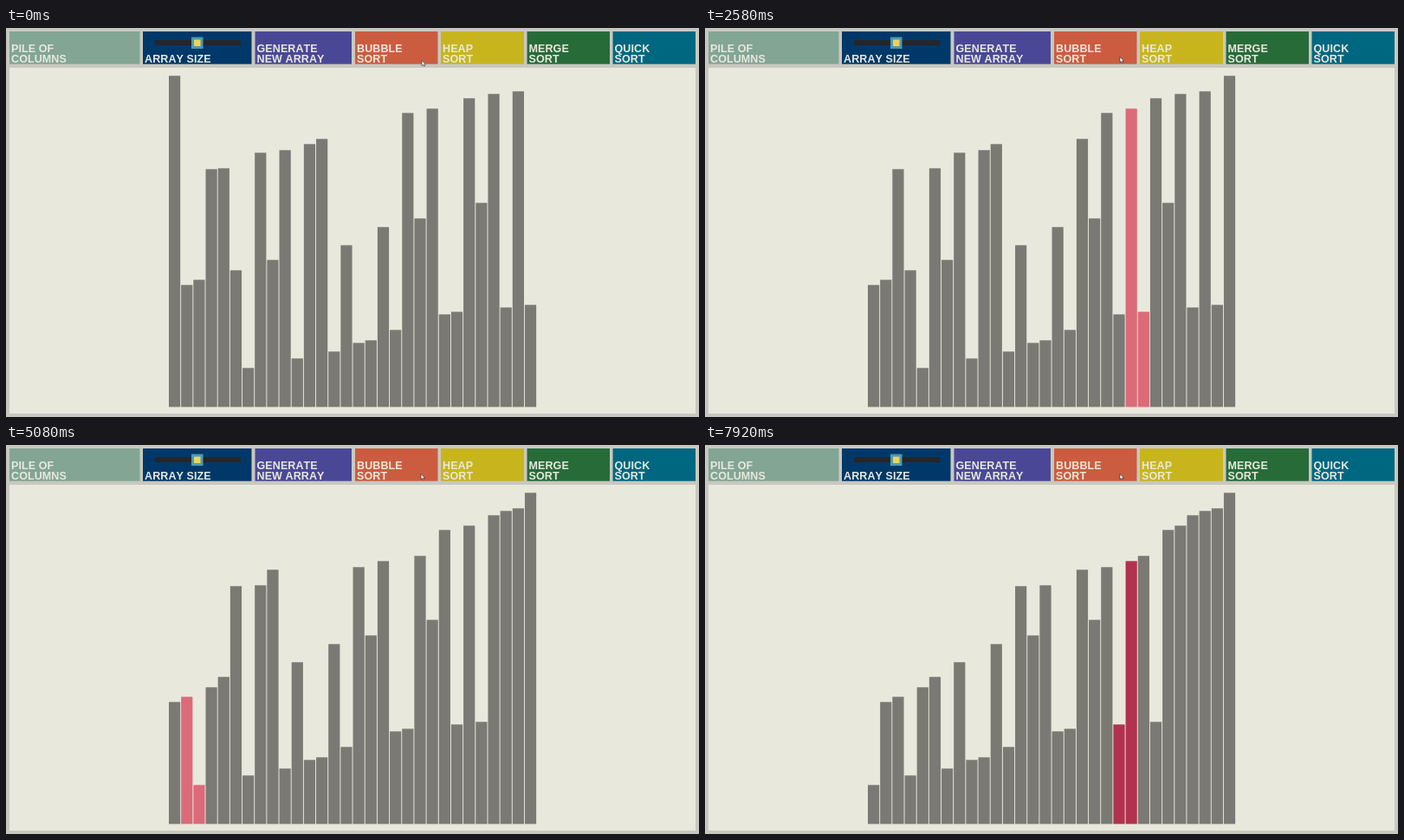
Write an HTML page that moves like this. It is 800 px wide and 450 px high and loops after 8000 ms.

```html
<!DOCTYPE html>
<html lang="en">
<head>
<meta charset="utf-8">
<title>Bubble sort</title>
<style>
  html, body { margin: 0; width: 100%; height: 100%; overflow: hidden; background: #c8c8c0; }
  svg { display: block; width: 100vw; height: 100vh; }
  text {
    font: bold 12.5px "Liberation Sans", Arial, sans-serif;
    letter-spacing: .1px; font-kerning: none; fill: #e8e8dc;
  }
</style>
</head>
<body>
<svg id="stage" viewBox="0 0 800 450">
  <rect width="800" height="450" fill="#c8c8c0"/>
  <rect x="4" y="46" width="792" height="400" fill="#e8e8dc"/>
  <g id="tiles"></g>
  <g id="slider">
    <rect x="172" y="14" width="99" height="6" fill="#25262a"/>
    <rect x="214" y="10.5" width="13.5" height="13.5" fill="#4b9bb0"/>
    <rect x="217" y="13.5" width="7.5" height="7.5" fill="#efd25c"/>
  </g>
  <g id="bars"></g>
  <path id="cursor" d="M0 0V6.2L1.5 5L2.5 7L3.5 6.5L2.7 4.6H4.4Z" fill="#fff" stroke="#222" stroke-width=".6"/>
</svg>
<script>
const LOOP = 8000;
const FRAME_CS = 100 / 12;   // picture interval in hundredths of a second
const START = 201;           // ms before the first comparison
const TICK = 26.09;          // ms per sorting state
const BASE = 438.4;
const COLOR = { idle: '#7a7973', keep: '#4c4b52', found: '#db6b78', swapped: '#b0324f' };

const TILES = [
  [4, 154.5, '#82a594', 'PILE OF', 'COLUMNS'],
  [158, 283.5, '#003869', '', 'ARRAY SIZE'],
  [287.5, 399, '#4a4896', 'GENERATE', 'NEW ARRAY'],
  [403, 498.5, '#cb5c40', 'BUBBLE', 'SORT'],
  [502, 598, '#c8b51e', 'HEAP', 'SORT'],
  [601.5, 697, '#276b39', 'MERGE', 'SORT'],
  [700.5, 796, '#006780', 'QUICK', 'SORT']
];

const TOPS = [
  55, 297, 291, 163, 162, 280, 393, 144, 268, 141,
  382, 134, 128, 374, 251, 364, 361, 230, 349, 98,
  220, 93, 331, 328, 81, 202, 76, 323, 73, 320
];

function add(parent, tag, attrs, label = '') {
  const node = document.createElementNS('http://www.w3.org/2000/svg', tag);
  for (const key in attrs) node.setAttribute(key, attrs[key]);
  node.textContent = label;
  return document.getElementById(parent).appendChild(node);
}

for (const [left, right, fill, upper, lower] of TILES) {
  add('tiles', 'rect', { x: left, y: 4, width: right - left, height: 37.7, fill });
  add('tiles', 'text', { x: left + 2, y: 28.2 }, upper);
  add('tiles', 'text', { x: left + 2, y: 39.6 }, lower);
}

const bars = TOPS.map((_, i) => add('bars', 'rect', { x: 188 + i * 14.17, width: 13.2 }));
const cursor = document.getElementById('cursor');

// Every visible state of the sort: a kept pair takes one tick, a swapped pair two.
function sortStates(start) {
  const tops = [...start];
  const states = [];
  const record = (at, color) => states.push({ tops: [...tops], at, color });
  for (let end = tops.length - 1; end > 0; end--) {
    for (let j = 0; j < end; j++) {
      if (tops[j] >= tops[j + 1]) {
        record(j, COLOR.keep);
        continue;
      }
      record(j, COLOR.found);
      [tops[j], tops[j + 1]] = [tops[j + 1], tops[j]];
      record(j, COLOR.swapped);
    }
  }
  return states;
}

const states = sortStates(TOPS);
const idle = { tops: TOPS, at: -9, color: COLOR.idle };

function draw(time) {
  const frame = Math.floor((Math.floor(time / 10) + 0.5) / FRAME_CS);
  const shown = frame * FRAME_CS * 10;
  const { tops, at, color } = states[Math.floor((shown - START) / TICK)] || idle;
  bars.forEach((bar, i) => {
    const top = tops[i] + 0.3;
    bar.setAttribute('y', top);
    bar.setAttribute('height', BASE - top);
    bar.setAttribute('fill', i === at || i === at + 1 ? color : COLOR.idle);
  });
  const glide = Math.min(frame / 2, 1);
  cursor.setAttribute('transform', `translate(${480 - glide} ${37.5 - 4 * glide})`);
}

const begin = performance.now();
function play() {
  draw((performance.now() - begin) % LOOP);
  requestAnimationFrame(play);
}
play();
</script>
</body>
</html>
```
